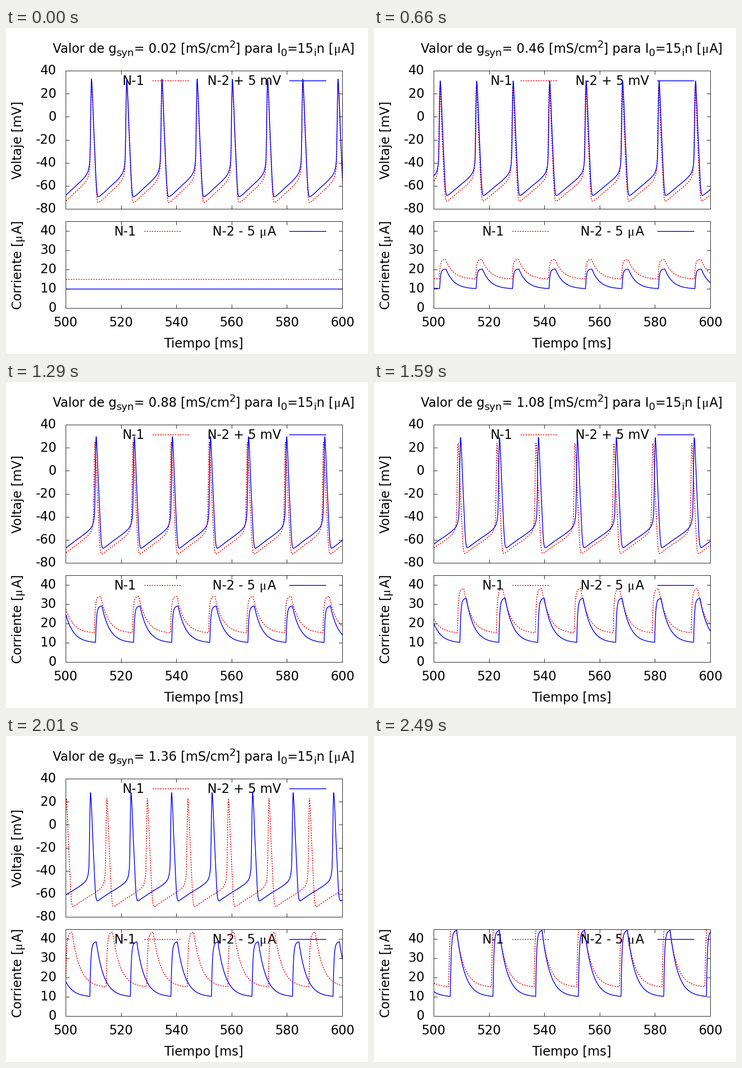
Animation of 789x710 px, one loop 2520 ms. Source, as a matplotlib script:

```python
import numpy as np
import matplotlib.pyplot as plt
from matplotlib.animation import FuncAnimation
from matplotlib.patches import Rectangle

W, H, DPI = 789, 710, 64
FRAMES, INTERVAL = 84, 30
FONT = 27.5                      # text size in pixels
LEFT, RIGHT = 130.5, 733.5
RED, BLUE = "#ff0000", "#0000ff"
DASH = (0, (1.7, 1.5))

PT = 72 / DPI                    # points per pixel
fig = plt.figure(figsize=(W / DPI, H / DPI), dpi=DPI, facecolor="white")
ax = fig.add_axes([0, 0, 1, 1])
ax.set_xlim(0, W)
ax.set_ylim(H, 0)
ax.axis("off")


def pchip(x, xs, ys, flat_ends=False):
    """Shape-preserving cubic through the points (xs, ys)."""
    xs, ys = np.asarray(xs, float), np.asarray(ys, float)
    h = np.diff(xs)
    d = np.diff(ys) / h
    m = np.zeros(len(xs))
    same = d[:-1] * d[1:] > 0
    a, b = 2 * h[1:] + h[:-1], h[1:] + 2 * h[:-1]
    with np.errstate(divide="ignore", invalid="ignore"):
        m[1:-1] = np.where(same, (a + b) / (a / d[:-1] + b / d[1:]), 0)
    if not flat_ends:
        m[0], m[-1] = d[0], d[-1]
    i = np.clip(np.searchsorted(xs, x, side="right") - 1, 0, len(h) - 1)
    s = (x - xs[i]) / h[i]
    return (ys[i] * (1 + 2 * s) * (1 - s) ** 2 + ys[i + 1] * s * s * (3 - 2 * s)
            + h[i] * (m[i] * s * (1 - s) ** 2 - m[i + 1] * s * s * (1 - s)))


# Conductance knots: period, time of one reference spike, lag of neuron 2.
G = [0.02, 0.28, 0.64, 0.88, 1.08, 1.36, 1.68]
PERIOD = [12.73, 12.97, 13.42, 13.77, 14.08, 14.65, 15.43]
SPIKE = [509.25, 520.05, 537.75, 551.8, 565.05, 588.05, 613.6]
LAG = [0, 0.1, 0.25, 0.45, 0.9, 8.75, 16.0]

time = np.linspace(500, 600, 2001)


def voltage(spike, period, g):
    low, peak = -74.3 + 2.5 * g, 28.1 - 3.7 * g
    after = [(0, peak), (0.41, 12 - 3 * g), (0.75, -10 - 2 * g),
             (1.16, -32 - g), (1.57, -55), (1.9, -68 + g),
             (2.13, low + 1.4), (2.4, low), (2.75, low + 0.25),
             (3.5, low + 1.5), (6, -67.2 + 1.4 * g)]
    before = [(-2.73, -58 + 1.5 * g), (-1.74, -54.8 + 0.9 * g),
              (-1.08, -50.8 + 0.5 * g), (-0.58, -41.7), (-0.41, -25),
              (-0.25, 3 - 2 * g), (0, peak)]
    xs, ys = zip(*after, *[(period + x, y) for x, y in before])
    return pchip((time - spike) % period, xs, ys, flat_ends=True)


def current(spike, period, g):
    hold, decay = 2.3, 2.85
    u = (time - spike + 0.22) % period
    rest = np.exp(-(period - hold) / decay)
    rise = 1 - (1 - rest) * np.exp(-u / 0.32)
    climb = 0.96 + 0.04 * u / hold
    fall = np.exp(-(u - hold) / decay)
    gain = 23.3 * g - 1.6 * g * g
    return 15 + gain * np.where(u < hold, rise * climb, fall)


def to_x(t):
    return LEFT + (t - 500) / 100 * (RIGHT - LEFT)


def crisp(v):
    return np.floor(v) + 0.5


def label(x, y, s, scale=1.0, family="DejaVu Sans", rotation=0):
    return ax.text(x, y, s, fontsize=FONT * scale * PT, family=family,
                   rotation=rotation, rotation_mode="anchor", ha="left",
                   va="baseline", color="black", zorder=1)


def mu(x, y, rotation=0):
    return label(x, y, "\u03bc", family="Liberation Serif", rotation=rotation)


def stroke(xs, ys, color="black", width=1.0, **kw):
    return ax.plot(xs, ys, color=color, lw=width * PT, snap=False,
                   solid_joinstyle="round", **kw)[0]


def tick(x, y, dx=0, dy=0):
    return stroke([x, x + dx], [y, y + dy], zorder=4, solid_capstyle="butt")


def trace(color, xs=(), ys=(), z=3):
    style = DASH if color == RED else "-"
    return stroke(xs, ys, color, 1.7, linestyle=style, zorder=z,
                  dash_capstyle="butt", solid_capstyle="butt")


class Panel:
    def __init__(self, top, bottom, low, high, ticks):
        self.top, self.bottom, self.low, self.high = top, bottom, low, high
        box = Rectangle((LEFT, top), RIGHT - LEFT, bottom - top, fill=False,
                        ec="black", lw=PT, zorder=4, snap=False)
        self.parts = [ax.add_patch(box)]
        for v in ticks:
            y = self.to_y(v)
            text = str(v)
            width = FONT * sum(0.361 if c == "-" else 0.636 for c in text)
            self.parts += [label(109.5 - width, y + 7.9, text),
                           tick(LEFT, crisp(y), dx=8),
                           tick(RIGHT, crisp(y), dx=-8)]
        for t in (520, 540, 560, 580):
            x = crisp(to_x(t))
            self.parts += [tick(x, top, dy=8), tick(x, bottom, dy=-8)]
        self.red, self.blue = trace(RED), trace(BLUE)
        for line in (self.red, self.blue):
            line.set_clip_path(Rectangle((LEFT - 1, top - 0.5),
                                         RIGHT - LEFT + 1.5, bottom - top + 1,
                                         transform=ax.transData))
        self.parts += [self.red, self.blue]

    def to_y(self, v):
        span = self.high - self.low
        return self.bottom - (v - self.low) / span * (self.bottom - self.top)

    def key(self, y, red_x, blue_x=617.5):
        self.parts += [trace(RED, [red_x, red_x + 80], [y, y]),
                       trace(BLUE, [blue_x, blue_x + 80.5], [y, y])]

    def show(self, red, blue):
        self.red.set_data(to_x(time), self.to_y(red))
        self.blue.set_data(to_x(time), self.to_y(blue))


volts = Panel(93.5, 394.5, -80, 40, range(-80, 41, 20))
amps = Panel(421.5, 610.5, 0, 45, range(0, 41, 10))

volts.key(115, 319.5)
amps.key(443, 301.5)

BASE = 54
formula = label(279.5, BASE, "")
volts.parts += [
    label(101.8, BASE, "Valor de g"), label(241, BASE + 7, "syn", 0.8),
    formula, label(486.6, BASE - 11, "2", 0.8),
    label(499.6, BASE, "] para I"), label(598.6, BASE + 7, "0", 0.8),
    label(612, BASE, "=15"), label(670.5, BASE + 7, "i", 0.8),
    label(676.6, BASE, "n ["), mu(714.5, BASE), label(730.8, BASE, "A]"),
    label(253.5, 124, "N-1"), label(438.9, 124, "N-2 + 5 mV"),
    label(34, 329, "Voltaje [mV]", rotation=90),
]

label(235, 452, "N-1")
label(450.4, 452, "N-2 - 5")
mu(552.4, 452)
label(569.5, 452, "A")
label(34, 613, "Corriente [", rotation=90)
mu(34, 464.5, rotation=90)
label(34, 447.5, "A]", rotation=90)
for t in range(500, 601, 20):
    label(to_x(t) - 1.5 * 0.636 * FONT, 650, str(t))
label(344.2, 696, "Tiempo [ms]")


def draw(n):
    g = 0.02 * (n + 1)
    period, first, lag = (pchip(g, G, ys) for ys in (PERIOD, SPIKE, LAG))
    second = first + lag
    gain = g if n else 0         # the first state is uncoupled
    volts.show(voltage(first, period, g), voltage(second, period, g) + 5)
    amps.show(current(first, period, gain), current(second, period, gain) - 5)
    formula.set_text(f"= {g:.2f} [mS/cm")
    # the last step shows only the lower panel
    for part in volts.parts:
        part.set_visible(n < FRAMES - 1)
    return []


anim = FuncAnimation(fig, draw, frames=FRAMES, interval=INTERVAL,
                     init_func=lambda: draw(0), repeat=True, repeat_delay=0,
                     blit=False)
plt.show()
```
